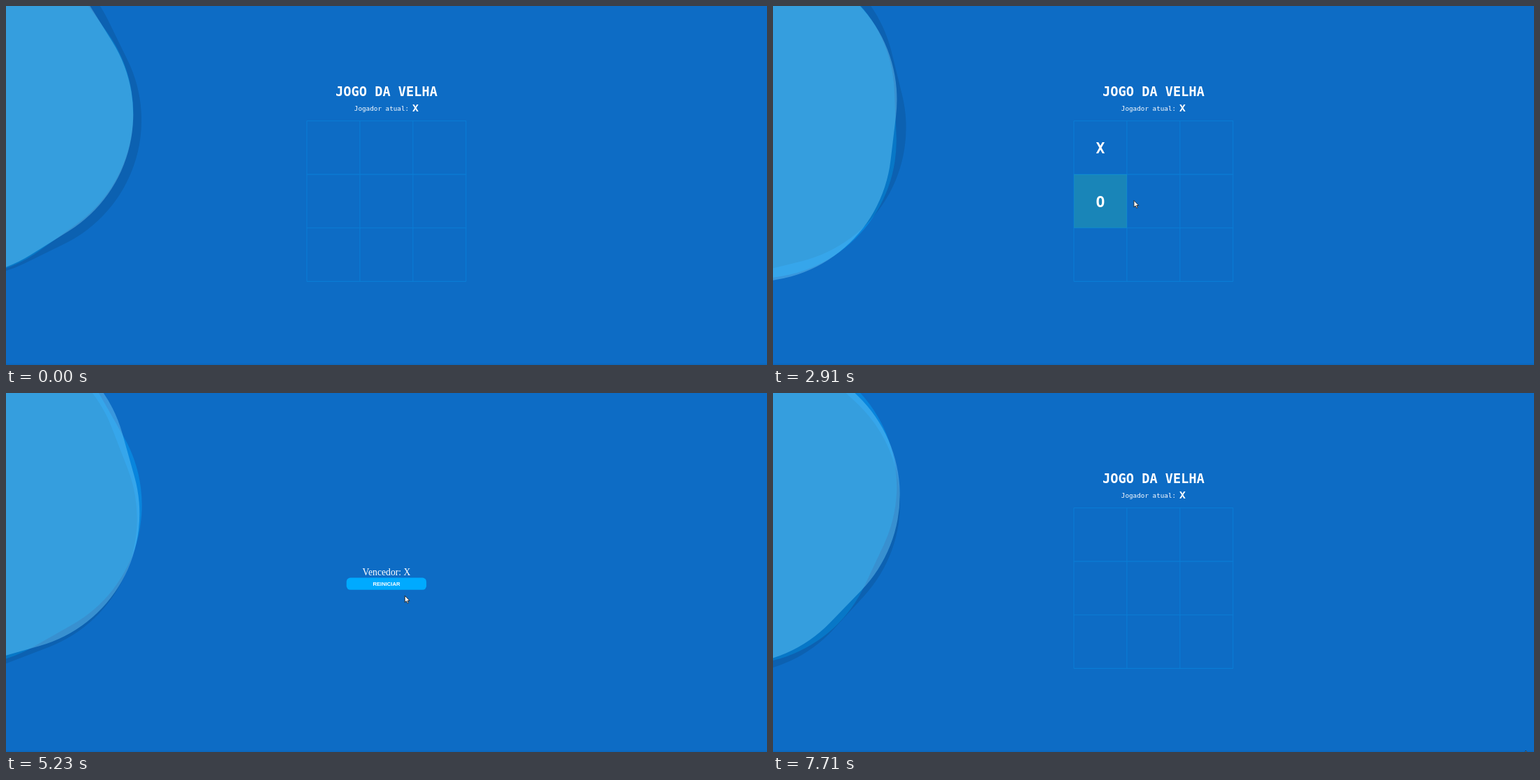
An HTML page with a canvas that plays this animation: 1090 by 514 pixels, repeating every 7790 ms.

```html
<!DOCTYPE html>
<html lang="pt-BR">
<head>
<meta charset="utf-8">
<title>Jogo da velha</title>
<style>
html, body { margin: 0; width: 100%; height: 100%; overflow: hidden; background: #0d6cc5; }
canvas { display: block; width: 1090px; height: 514px; }
</style>
</head>
<body>
<canvas id="stage"></canvas>
<script>
const W = 1090, H = 514, LOOP = 7790;
const canvas = document.getElementById('stage');
const ctx = canvas.getContext('2d');
const dpr = window.devicePixelRatio || 1;
canvas.width = W * dpr;
canvas.height = H * dpr;

const MONO = '"DejaVu Sans Mono", "Noto Sans Mono", monospace';
const SANS = '"Liberation Sans", Arial, sans-serif';
const SERIF = '"Liberation Serif", "Times New Roman", serif';

// Rounded squares turning about an off-centre pivot
const WAVES = [
  { color: 'rgba(0,170,255,.4)', start: 144.5, speed: -50.5 },
  { color: 'rgba(0,0,0,.1)', start: -116, speed: -119.5 },
  { color: 'rgba(123,215,255,.4)', start: 148, speed: -48.5 },
];
const PIVOT = [-54, 153], R = 229;

// The pointer rests around each stop and glides between them
const STOPS = [
  { t: -90, x: 1001, y: 487 },
  { t: 1860, x: 474, y: 204 },
  { t: 2560, x: 470, y: 281 },
  { t: 3200, x: 543, y: 277 },
  { t: 3780, x: 546, y: 356 },
  { t: 4240, x: 608, y: 357 },
  { t: 5680, x: 564, y: 277 },
  { t: 6390, x: 541, y: 271 },
  { t: 7870, x: 1078, y: 512 },
];
const REST = 160;
const CLICKS = STOPS.slice(1, 7);
const TURNS = CLICKS.slice(0, 4);
const WIN = CLICKS[4].t + 50, RESET = CLICKS[5].t + 60;

const GRID = { x: 431, y: 164.5, w: 76, h: 76.6 };

function pointer(t) {
  const i = STOPS.findIndex(s => s.t > t);
  const a = STOPS[i - 1], b = STOPS[i];
  const span = b.t - a.t - 2 * REST;
  const k = Math.min(1, Math.max(0, (t - a.t - REST) / span));
  const ease = k * k * (3 - 2 * k);
  return { x: a.x + (b.x - a.x) * ease, y: a.y + (b.y - a.y) * ease };
}

function cellAt({ x, y }) {
  const col = Math.floor((x - GRID.x) / GRID.w);
  const row = Math.floor((y - GRID.y) / GRID.h);
  const inside = Math.min(col, row) >= 0 && Math.max(col, row) < 3;
  return inside && { x: GRID.x + col * GRID.w, y: GRID.y + row * GRID.h };
}

function text(str, x, y, font, align = 'center') {
  ctx.font = font;
  ctx.textAlign = align;
  ctx.fillStyle = '#fff';
  ctx.fillText(str, x, y);
}

function box(x, y, w, h, r, color) {
  ctx.fillStyle = color;
  ctx.beginPath();
  ctx.roundRect(x, y, w, h, r);
  ctx.fill();
}

function waves(t) {
  for (const { color, start, speed } of WAVES) {
    ctx.save();
    ctx.translate(...PIVOT);
    ctx.rotate((start + speed * t / 1000) * Math.PI / 180);
    box(-R, -.96 * R, 2 * R, 2 * R, .86 * R, color);
    ctx.restore();
  }
}

function board(t) {
  const done = t < WIN ? TURNS.filter(c => c.t <= t) : [];
  text('JOGO DA VELHA', 545, 128.7, `bold 18.65px ${MONO}`);
  text('Jogador atual:', 498.8, 150, `9.3px ${MONO}`, 'left');
  text('XO'[done.length % 2], 586.6, 151, `bold 14.9px ${MONO}`);

  const lit = cellAt(pointer(t - 70)); // the highlight trails the pointer
  if (lit) box(lit.x, lit.y, GRID.w, GRID.h, 0, '#1985b8');

  ctx.strokeStyle = 'rgba(0,170,255,.26)';
  ctx.lineWidth = 1.15;
  ctx.beginPath();
  for (let i = 0; i < 4; i++) {
    const x = GRID.x + i * GRID.w - .1, y = GRID.y + i * GRID.h;
    ctx.moveTo(x, GRID.y);
    ctx.lineTo(x, GRID.y + 3 * GRID.h);
    ctx.moveTo(GRID.x, y);
    ctx.lineTo(GRID.x + 3 * GRID.w, y);
  }
  ctx.stroke();

  done.forEach((click, i) => {
    const cell = cellAt(click);
    text('XO'[i % 2], cell.x + GRID.w / 2, cell.y + 46.5, `bold 21.3px ${MONO}`);
  });
}

function result() {
  text('Vencedor: X', 545, 261, `13.7px ${SERIF}`);
  box(487.7, 264.6, 114.4, 17.2, 5.5, '#0af');
  text('REINICIAR', 545, 276.2, `bold 7.64px ${SANS}`);
}

const ARROW = new Path2D('M0 0V9.6L2.2 7.6 3.8 11 5.3 10.3 3.8 7.1H6.8Z');
const HAND = new Path2D('M-1 1Q0-.6 1 1V5L6.2 6.2Q7.4 6.6 7.2 8L6.2 13H1.2L-2.4 8.6Q-2.6 7.2-1 7.8Z');

function cursor(t, over) {
  if (t < 70) return;
  const { x, y } = pointer(t);
  if (CLICKS.some(c => Math.abs(t - c.t) < 60)) box(x - 7, y - 8, 14, 14, 7, 'rgba(200,225,30,.6)');
  const onButton = over && Math.abs(y - 273) < 9 && Math.abs(x - 545) < 57;
  const shape = onButton ? HAND : ARROW;
  ctx.save();
  ctx.translate(x, y);
  ctx.fillStyle = '#fff';
  ctx.strokeStyle = '#222';
  ctx.lineWidth = .9;
  ctx.fill(shape);
  ctx.stroke(shape);
  ctx.restore();
}

function draw() {
  const t = performance.now() % LOOP;
  const over = t >= WIN && t < RESET;
  ctx.setTransform(dpr, 0, 0, dpr, 0, 0);
  box(0, 0, W, H, 0, '#0d6cc5');
  box(0, 512, W, 2, 0, '#0c67bc');
  waves(t);
  if (over) result(); else board(t);
  cursor(t, over);
  requestAnimationFrame(draw);
}
draw();
</script>
</body>
</html>
```
